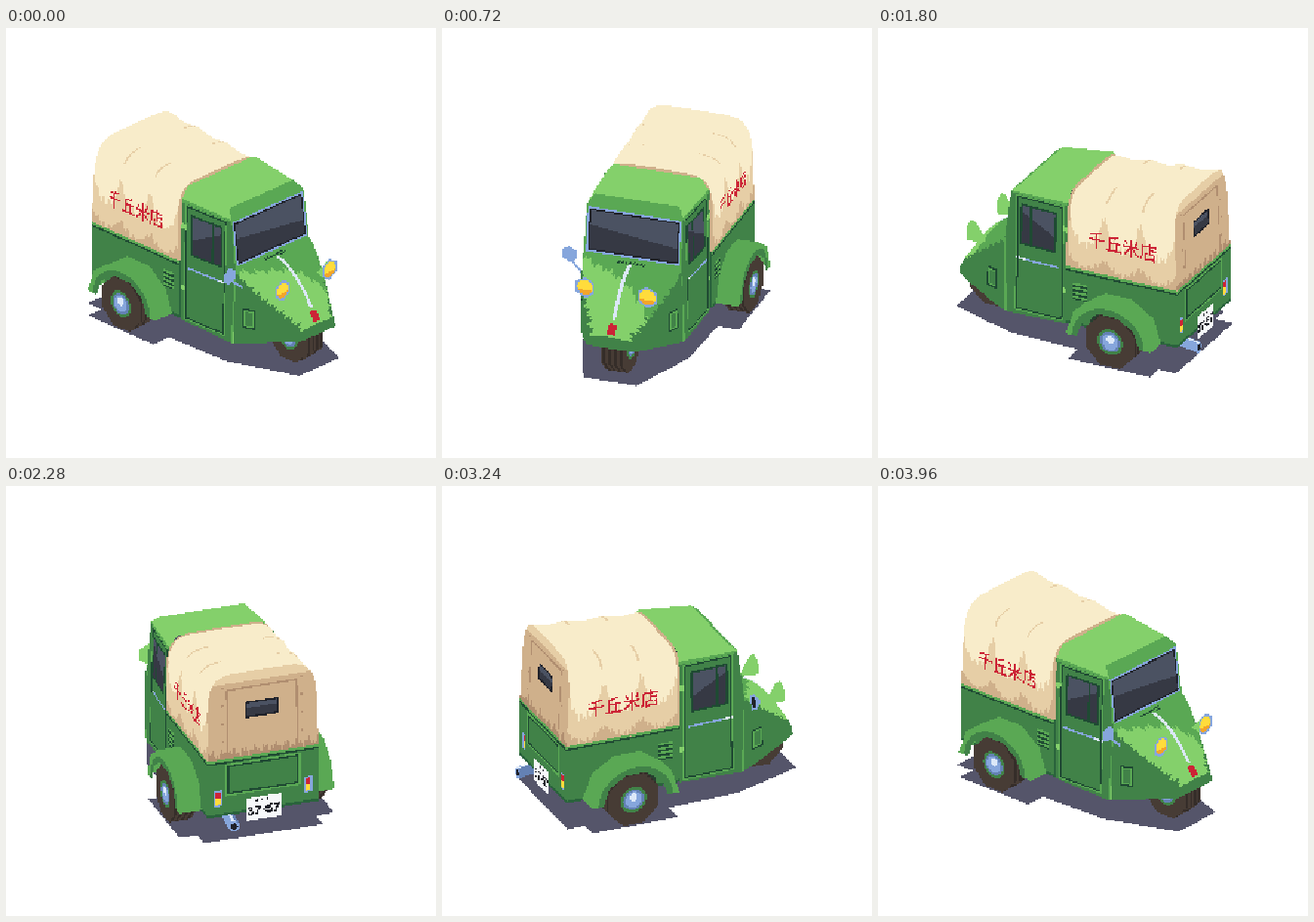
These frames come from a looping animation (440 by 440 pixels, 4000 ms). An HTML page with a canvas:

```html
<!DOCTYPE html>
<html lang="ja">
<head>
<meta charset="utf-8">
<title>Three-wheeler</title>
<style>
html, body { margin: 0; width: 100%; height: 100%; overflow: hidden; background: #fff; }
canvas { display: block; width: 100vw; height: 100vh; image-rendering: pixelated; }
</style>
</head>
<body>
<canvas id="stage" width="300" height="300"></canvas>
<script>
const N = 300, SCALE = N / 440, LOOP = 4000, STEP = 40;
const TILT_SIN = .45, TILT_COS = .893;
const { abs, sin, cos, hypot, PI, floor, ceil, min, max, sign } = Math;

const rgb = h => {
  const v = parseInt(h, 16);
  return (0xff000000 | (v & 255) << 16 | (v & 0xff00) | v >> 16) >>> 0;
};
const palette = {
  light: '84d06b', mid: '5aa854', base: '418248', dark: '2a633c', line: '1f4a33', well: '273f30',
  cream: 'f8ecca', tan: 'e6cea6', shade: 'cfb08b', seam: 'b08e70',
  glass: '363944', sheen: '4b5262', chrome: '86a6dc', shine: 'dce8f8', steel: '6481b4',
  tyre: '473c35', tread: '352d29', yellow: 'ffdc3c', orange: 'f3a52a',
  red: 'cc2436', white: 'f6f8fa', ink: '20222a', shadow: '55556a'
};
const K = {};
for (const name in palette) K[name] = rgb(palette[name]);

// ---- mesh: x forward, y to the vehicle's right, z up ----
const mesh = [];
const face = (pts, paint) => {
  const fn = typeof paint === 'function' ? paint : () => paint;
  for (let i = 2; i < pts.length; i++) mesh.push({ p: [pts[0], pts[i - 1], pts[i]], fn });
};
const series = (n, make) => Array.from({ length: n + 1 }, (_, i) => make(i / n, i));
const both = make => [1, -1].forEach(make);
const loft = (rows, paint, closed) => {
  for (let r = 1; r < rows.length; r++) {
    const a = rows[r - 1], b = rows[r], n = a.length;
    for (let i = 0; i < (closed ? n : n - 1); i++) {
      const j = (i + 1) % n;
      face([a[i], a[j], b[j], b[i]], paint);
    }
  }
};
const circle = (n, r, place) => series(n - 1, (_, i) => {
  const a = (i + .5) * 2 * PI / n;
  return place(r * cos(a), r * sin(a));
});
const acrossPanel = (x, w, z0, z1, paint) =>
  face([[x, -w, z0], [x, w, z0], [x, w, z1], [x, -w, z1]], paint);

// ---- paint helpers ----
const within = (u, v, [u0, u1, v0, v1], m = 0) =>
  u > u0 + m && u < u1 - m && v > v0 + m && v < v1 - m;
const ring = (u, v, box, t) => within(u, v, box) && !within(u, v, box, t);
const jag = u => sin(u * .9) + sin(u * 2.3 + 1);

function stencil(text, w, h, font) {
  const c = document.createElement('canvas');
  c.width = w; c.height = h;
  const g = c.getContext('2d');
  g.font = font;
  g.textAlign = 'center';
  g.textBaseline = 'middle';
  g.fillText(text, w / 2, h / 2 + 1);
  const d = g.getImageData(0, 0, w, h).data;
  return (u, v) => u >= 0 && v >= 0 && u < w && v < h && d[(floor(v) * w + floor(u)) * 4 + 3] > 90;
}
const shopName = stencil('千丘米店', 82, 26, '500 20px "Noto Sans CJK JP", "Noto Sans CJK", sans-serif');
const digits = stencil('37-57', 37, 18, 'bold 14px "Liberation Sans", sans-serif');

// ---- materials ----
function tarpPaint(x, y, z) {
  if (x > -3) return K.shade;
  const fold = 1 - abs(sin(PI * (x + 127) / 42));
  if (z > 170) return fold > .92 && abs(y) > 30 ? K.tan : K.cream;
  const u = y > 0 ? x + 105 : -23 - x;
  if (shopName(u, 143 - z)) return K.red;
  if (z < 95 + 13 * fold + 2 * jag(x)) return K.shade;
  return z < 123 + 36 * fold ** 1.5 + 3 * jag(x) ? K.tan : K.cream;
}

function tarpBack(x, y, z) {
  const pane = [-18, 18, 134, 152], a = abs(y);
  if (ring(y, z, pane, 2)) return K.ink;
  if (within(y, z, pane)) return z > 145 ? K.sheen : K.glass;
  if (z < 168 && abs(a - 38) < 1 || a < 38 && abs(z - 168) < 1) return K.seam;
  if (abs(a - 43) < 1.2 && (z - 90) % 20 < 2) return K.seam;
  if (z < 98 + 3 * jag(y * .6)) return K.seam;
  return z > 175 ? K.tan : K.shade;
}

function bedSide(x, y, z) {
  if (z > 89) return K.mid;
  if (z > 87) return K.line;
  if (hypot(x + 61, z - 29) < 34) return K.well;
  if (within(x, z, [-24, -8, 56, 75])) return z % 5 < 2.5 ? K.line : K.mid;
  return z < 30 ? K.dark : K.base;
}

function bedBack(x, y, z) {
  const a = abs(y), lamp = [44.5, 53.5, 39, 57];
  if (ring(a, z, lamp, 1.8)) return K.chrome;
  if (within(a, z, lamp)) return z > 48 ? K.red : K.yellow;
  if (z > 89) return K.mid;
  if (z > 87 || ring(y, z, [-39, 39, 51, 84], 2)) return K.line;
  if (ring(y, z, [-41, 41, 49, 86], 2)) return K.mid;
  return z < 30 ? K.dark : K.base;
}

function cabSide(x, y, z) {
  const pane = [13, 56, 102, 148], door = [6, 60, 28, 156];
  if (ring(x, z, pane, 2.2)) return K.line;
  if (within(x, z, pane)) {
    if (abs(x - 43) < 1.5) return K.line;
    return z - x * .5 > 112 ? K.sheen : K.glass;
  }
  if (ring(x, z, door, 1.7)) return K.line;
  if (within(x, z, [10, 61, 85, 87.4])) return x > 50 ? K.shine : K.chrome;
  if (x < 6 && (abs(z - 62) < 3 || abs(z - 132) < 3)) return K.light;
  if (ring(x, z, [4.5, 61.5, 26.5, 157.5], 1.5)) return K.mid;
  return z > 158 ? K.mid : K.base;
}

function screenPaint(x, y, z) {
  const pane = [-51, 51, 108.5, 157];
  if (!within(y, z, pane)) return K.mid;
  if (ring(y, z, pane, 2)) return K.chrome;
  if (ring(y, z, pane, 3.6)) return K.ink;
  return z > 132 + y * .12 ? K.sheen : K.glass;
}

function nosePaint(x, y, z) {
  const a = abs(y), hatch = [83, 97, 43, 65];
  if (a < 4.5 && x > 133 && x < 139) return K.red;
  if (a < 2 && x > 82 && x < 131) return K.shine;
  if (a < 15 && x > 75.5 && x < 81) return (y + 60) % 4 < 2 ? K.line : K.mid;
  if (a > 35 && ring(x, z, hatch, 1.8)) return K.line;
  if (a > 35 && ring(x, z, hatch, 3.4)) return K.mid;
  const shoulder = 106 - 56 * ((x - 74) / 66) ** 2.1 - 13 * sin(PI * (x - 74) / 66);
  if (z < shoulder - 3 + jag(x)) return K.base;
  return x + y * .5 + 2 * jag(y * .5) > 102 ? K.light : K.mid;
}

function platePaint(x, y, z) {
  if (digits(y + 18.5, 38 - z)) return K.ink;
  return abs(z - 40) < 1.2 && abs(y) < 9 && (y + 9) % 6 < 2.4 ? K.ink : K.white;
}

// ---- shadow ----
const slab = (x0, w0, x1, w1) =>
  face([[x0, w0, 0], [x0, -w0, 0], [x1, -w1, 0], [x1, w1, 0]], K.shadow);
slab(142, 29, 65, 58);
slab(65, 58, -128, 65);
slab(-14, 84, -108, 84);

// ---- cargo bed and canvas cover ----
both(s => face([[-127, 60 * s, 27], [0, 60 * s, 27], [0, 60 * s, 92], [-127, 60 * s, 92]], bedSide));
acrossPanel(-127, 60, 27, 92, bedBack);
acrossPanel(0, 60, 27, 92, K.dark);
acrossPanel(-129, 18.5, 18, 44, platePaint);

const ribs = series(12, k => series(16, t => {
  const c = cos(PI * t), s = sin(PI * t);
  const rise = max(0, s) ** (1 / 3);
  const sag = 4 * sin(3 * PI * k) ** 2 * rise ** 3;
  return [
    (1 - k) * (5 * rise - 127),
    60 * sign(c) * abs(c) ** (1 / 3),
    90 + (96 - 10 * k) * rise - sag
  ];
}));
loft(ribs, tarpPaint);
face(ribs[0], tarpBack);
face(ribs[12], K.shade);

// ---- cab ----
both(s => {
  face([[0, 58 * s, 25], [70, 56 * s, 22], [74, 53.5 * s, 106], [0, 58 * s, 106]], cabSide);
  face([[0, 58 * s, 106], [74, 53.5 * s, 106], [67, 52 * s, 160], [0, 56 * s, 162]], cabSide);
  face([[0, 56 * s, 162], [67, 52 * s, 160], [58, 46 * s, 168], [0, 48 * s, 174]], K.light);
});
face([[0, -48, 174], [0, 48, 174], [58, 46, 168], [58, -46, 168]], K.light);
face([[58, -46, 168], [58, 46, 168], [67, 52, 160], [67, -52, 160]], K.mid);
face([[67, -52, 160], [67, 52, 160], [74, 53.5, 106], [74, -53.5, 106]], screenPaint);
acrossPanel(0, 57, 25, 162, K.base);

// ---- nose: a tapering hood over upright flanks ----
const noseRows = s => series(8, t => {
  const bulge = sin(PI * t);
  const halfWidth = 53.5 - 30 * t ** 1.6;
  const ridge = 106 - 56 * t ** 2.1;
  const shoulder = ridge - 10 * bulge - 5 * t;
  const sill = 22 + 15 * t;
  return series(4, v => {
    const top = min(1, v * 2), side = max(0, v * 2 - 1);
    return [
      74 + 66 * t - 4 * bulge * top - 4 * side * (1 - t),
      s * (halfWidth * top + 2.5 * side),
      ridge + (shoulder - ridge) * top ** 2 + (sill - shoulder) * side
    ];
  });
});
both(s => {
  const rows = noseRows(s);
  loft(rows, nosePaint);
  face([[139, 0, 36], ...rows[8]], K.base);
});

// ---- lamps, mirror and exhaust ----
const cone = (n, r, [x, y, z], apex, lens, shell) => {
  const rim = circle(n, r, (u, v) => [x, y + u, z + v]);
  face(rim, (px, py, pz) => lens(hypot(py - y, pz - z), pz - z));
  rim.forEach((p, i) => face([p, rim[(i + 1) % n], apex], shell));
};
both(s => cone(6, 12, [123, 34 * s, 93], [106, 33 * s, 84],
  (d, h) => d > 8.5 ? K.chrome : h < -3 ? K.orange : K.yellow, K.light));
cone(6, 9, [79, 67, 105], [87, 67, 105], d => d > 6.5 ? K.chrome : K.ink, K.chrome);

const rod = (a, b, r, paint) => {
  const ends = [a, b].map(([x, y, z]) => circle(8, r, (u, v) => [x, y + u, z + v]));
  loft(ends, paint, true);
  return ends[1];
};
rod([80, 67, 102], [83, 52, 88], 1.4, K.chrome);
const pipe = rod([-112, -36, 25], [-140, -36, 20], 6, (x, y) => y > -35 ? K.steel : y < -38 ? K.chrome : K.shine);
face(pipe, (x, y, z) => hypot(y + 36, z - 20) > 3.6 ? K.chrome : K.ink);

// ---- wheels and fenders ----
function wheel(x, r, y0, y1) {
  const [inner, outer] = [y0, y1].map(y => circle(8, r, (u, v) => [x + u, y, r - 1 + v]));
  loft([inner, outer], (px, py) => (py + 200) % 6 < 3 ? K.tyre : K.tread, true);
  const disc = (px, py, pz) => {
    const d = hypot(px - x, pz - r + 1);
    if (d > 14.5) return K.tyre;
    if (d > 11.5) return K.base;
    if (hypot(px - x, pz - r - 2) < 4.5) return K.shine;
    return d < 9 ? K.chrome : K.steel;
  };
  face(inner, disc);
  face(outer, disc);
}
wheel(109, 29, -12, 12);
both(s => wheel(-62, 30, 60 * s, 83 * s));

const fenderArc = (y, shrink) => series(5, t =>
  [-60 + (49 - shrink) * cos(PI * t), y, 28 + (45 - shrink) * sin(PI * t)]);
both(s => {
  loft([fenderArc(60 * s, 0), fenderArc(84 * s, 0)], K.mid);
  loft([fenderArc(84 * s, 0), fenderArc(84 * s, 13)], (x, y, z) =>
    hypot((x + 60) / 49, (z - 28) / 45) > .84 ? K.mid : K.base);
});

// ---- depth-buffered drawing ----
const ctx = document.getElementById('stage').getContext('2d');
const image = ctx.createImageData(N, N);
const pixels = new Uint32Array(image.data.buffer);
const depth = new Float32Array(N * N);

function drawTriangle([a, b, c], [pa, pb, pc], fn) {
  const area = (b[0] - a[0]) * (c[1] - a[1]) - (b[1] - a[1]) * (c[0] - a[0]);
  if (abs(area) < 1e-6) return;
  const x0 = max(0, floor(min(a[0], b[0], c[0]))), x1 = min(N - 1, ceil(max(a[0], b[0], c[0])));
  const y0 = max(0, floor(min(a[1], b[1], c[1]))), y1 = min(N - 1, ceil(max(a[1], b[1], c[1])));
  for (let py = y0; py <= y1; py++) {
    for (let px = x0; px <= x1; px++) {
      const qx = px + .5, qy = py + .5;
      const v = ((qx - a[0]) * (c[1] - a[1]) - (qy - a[1]) * (c[0] - a[0])) / area;
      const w = ((b[0] - a[0]) * (qy - a[1]) - (b[1] - a[1]) * (qx - a[0])) / area;
      const u = 1 - v - w;
      if (u < 0 || v < 0 || w < 0) continue;
      const d = u * a[2] + v * b[2] + w * c[2], k = py * N + px;
      if (d <= depth[k]) continue;
      depth[k] = d;
      const mix = i => u * pa[i] + v * pb[i] + w * pc[i];
      pixels[k] = fn(mix(0), mix(1), mix(2));
    }
  }
}

function draw(heading) {
  const co = cos(heading), si = sin(heading);
  const project = ([x, y, z]) => {
    const across = x * co - y * si, near = x * si + y * co;
    return [
      (220 + across) * SCALE,
      (301.6 + near * TILT_SIN - z * TILT_COS) * SCALE,
      near * TILT_COS + z * TILT_SIN
    ];
  };
  pixels.fill(0xffffffff);
  depth.fill(-1e9);
  for (const { p, fn } of mesh) drawTriangle(p.map(project), p, fn);
  ctx.putImageData(image, 0, 0);
}

const start = performance.now();
let shown = -1;
function tick() {
  const step = floor(((performance.now() - start) % LOOP) / STEP);
  if (step !== shown) {
    shown = step;
    draw(PI / 4 + step * STEP / LOOP * 2 * PI);
  }
  requestAnimationFrame(tick);
}
tick();
</script>
</body>
</html>
```
